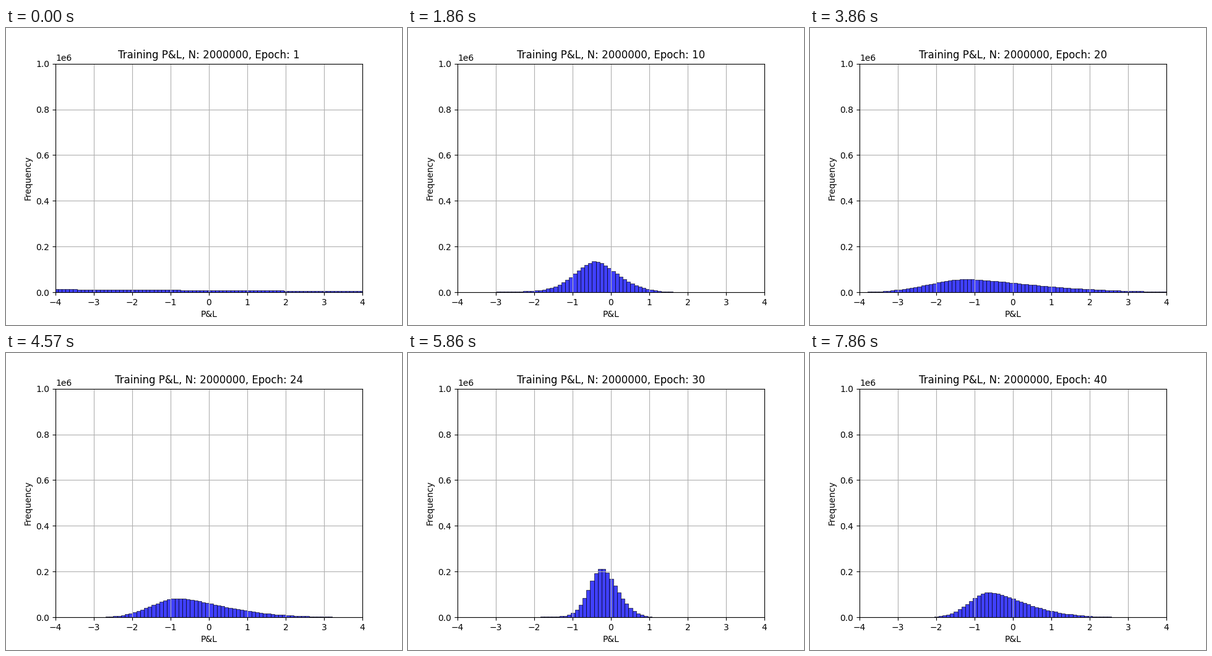
A matplotlib script for the animation above (8 s loop, 640 px wide and 480 px high).

```python
from math import gamma

import numpy as np
import matplotlib.pyplot as plt
from matplotlib.animation import FuncAnimation

LOOP, STEP = 8000, 20
SAMPLES, BIN = 2_000_000, 0.1
TAIL = 0.85

plt.rcParams["font.family"] = "DejaVu Sans"

# turning points of the training: where the peak sits, how far it
# spreads to each side, and the share of a long tail of losses
EPOCH = [1, 4, 7, 13, 20, 24, 30, 34, 38]
MODE = [-3.8, -1.1, 0.25, -1.1, -1.17, -0.8, -0.24, -0.24, -0.62]
LEFT = [8, 1.8, 0.34, 1.6, 1.43, 0.99, 0.46, 0.46, 0.72]
RIGHT = [9, 2.8, 0.283, 2.55, 2.47, 1.7, 0.56, 0.56, 1.32]
LOSSES = [0, 0, 0.565, 0, 0, 0, 0.06, 0.06, 0]


def at(epoch, values):
    return np.interp(epoch, EPOCH, values)


def spread_at(epoch, values):
    return np.exp(at(epoch, np.log(values)))


def histogram(epoch):
    """Left bin edges and counts; the area equals the sample count."""
    mode, w = at(epoch, MODE), at(epoch, LOSSES)
    sl, sr = spread_at(epoch, LEFT), spread_at(epoch, RIGHT)
    power = 1.65 * sr ** -0.12  # wide spreads fall off more slowly

    offset = 0.005 if 10 <= epoch <= 26 else 0.058
    edges = -4.1 + offset + BIN * np.arange(82)
    d = edges + BIN / 2 - mode
    a = np.abs(d)
    low = (1 - w) * np.exp(-(a / sl) ** 2) + w * np.exp(-a / TAIL)
    high = np.exp(-(a / sr) ** power)

    area = (1 - w) * sl * gamma(1.5) + w * TAIL + sr * gamma(1 + 1 / power)
    return edges, SAMPLES * BIN / area * np.where(d < 0, low, high)


def epoch_at(ms):
    # five epochs are spread over seven ticks per second
    tick = int((ms + 15) * 7 / 1000)
    return 1 + (5 * tick + 2) // 7


fig, ax = plt.subplots(figsize=(6.4, 4.8), dpi=100)
bars = ax.bar(np.zeros(82), np.zeros(82), width=BIN, align="edge",
              facecolor=(0, 0, 1, 0.75), edgecolor="black", linewidth=0.446)
ax.set_xlim(-4, 4)
ax.set_ylim(0, 1e6)
ax.set_xlabel("P&L")
ax.set_ylabel("Frequency")
ax.grid(True)
title = ax.set_title("")


def update(i):
    epoch = epoch_at(i * STEP)
    title.set_text(f"Training P&L, N: {SAMPLES}, Epoch: {epoch}")
    for bar, x, h in zip(bars, *histogram(epoch)):
        bar.set_x(x)
        bar.set_height(h)
        bar.set_visible(h > 300 and x < 4)
    return [title, *bars]


anim = FuncAnimation(fig, update, frames=LOOP // STEP, interval=STEP,
                     init_func=lambda: update(0), repeat=True)
plt.show()
```
